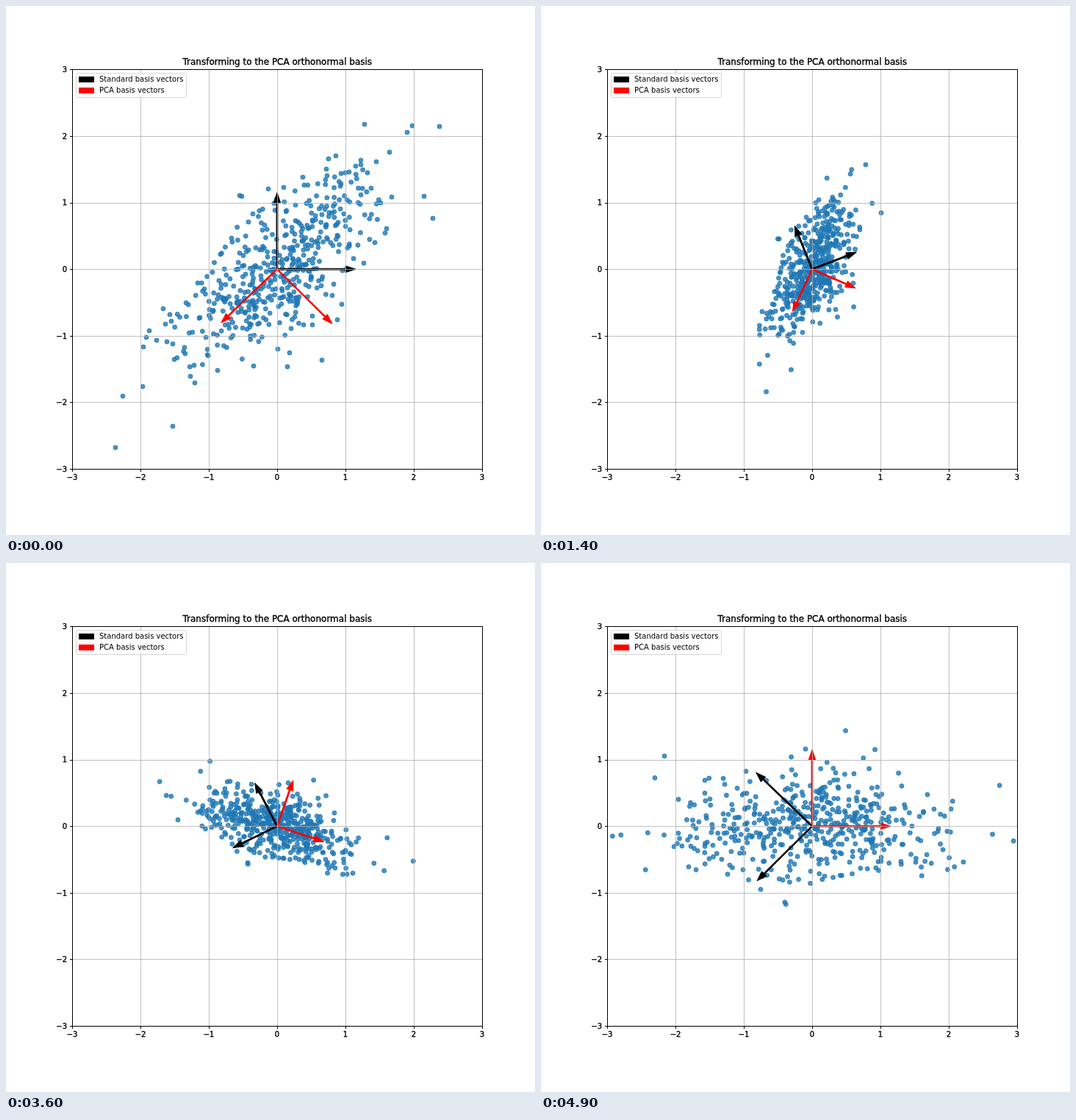
An HTML page with a canvas for the animation above (6.9 s loop, 720 by 720 pixels).

```html
<!DOCTYPE html>
<html lang="en">
<head>
<meta charset="utf-8">
<title>Transforming to the PCA orthonormal basis</title>
<style>
  html, body { margin: 0; width: 100%; height: 100%; overflow: hidden; background: #fff; }
  canvas, svg { position: absolute; left: 0; top: 0; width: 720px; height: 720px; }
  text { font: 10px "DejaVu Sans", sans-serif; }
  .heavy text { stroke: #000; stroke-width: .35px; }
  .heavy .title { font-size: 12px; }
  .mid { text-anchor: middle; }
  .end { text-anchor: end; }
</style>
</head>
<body>
<canvas id="plot" width="720" height="720"></canvas>
<svg viewBox="0 0 720 720">
  <path id="grid" fill="none" stroke="#b0b0b0" stroke-width=".8"/>
  <path id="ticks" fill="none" stroke="#000"/>
  <rect x="90.5" y="86.5" width="558" height="544" fill="none" stroke="#000"/>
  <g id="labels" class="heavy">
    <text class="title mid" x="369.3" y="80.2">Transforming to the PCA orthonormal basis</text>
  </g>
  <rect x="95.5" y="91.5" width="150" height="33" rx="2" fill="#fff" fill-opacity=".8" stroke="#ccc" stroke-opacity=".8"/>
  <rect x="99" y="96" width="21" height="8"/>
  <rect x="99" y="111" width="21" height="8" fill="#f00"/>
  <text x="127" y="103.4">Standard basis vectors</text>
  <text x="127" y="118.2">PCA basis vectors</text>
</svg>
<script>
const CX = 369, CY = 358.2, SX = 93, SY = 90.6;
const STEPS = 49, STEP_MS = 100, LOOP_MS = 6900;
const ANGLE = 135.5 * Math.PI / 180, COS = Math.cos(ANGLE), SIN = Math.sin(ANGLE);
const COUNT = 500;
const ctx = document.getElementById('plot').getContext('2d');

// Axes
let grid = '', ticks = '', labels = '';
for (let k = -3; k <= 3; k++) {
  const gx = Math.floor(CX + k * SX + .5) + .5;
  const gy = Math.floor(CY - k * SY + .5) + .5;
  const name = String(k).replace('-', '\u2212');
  grid += `M${gx} 86.5V630.5M90.5 ${gy}H648.5`;
  ticks += `M${gx} 630.5V634M87 ${gy}H90.5`;
  labels += `<text class="mid" x="${CX + k * SX}" y="644.8">${name}</text>` +
            `<text class="end" x="83" y="${CY - k * SY + 3.8}">${name}</text>`;
}
document.getElementById('grid').setAttribute('d', grid);
document.getElementById('ticks').setAttribute('d', ticks);
document.getElementById('labels').insertAdjacentHTML('beforeend', labels);

// Outer points of the cloud, in pixels
const outer = [
  149,601, 227,572, 159,531, 186,518, 257,513, 251,504, 288,496, 229,481,
  256,489, 187,464, 191,451, 195,442, 205,455, 219,457, 227,460, 214,412,
  223,420, 225,429, 217,433, 337,490, 383,491, 386,472, 370,467, 430,482,
  451,427, 457,406, 444,394, 417,434, 405,434, 417,422, 487,350, 502,322,
  516,309, 518,303, 581,289, 569,259, 525,260, 510,268, 497,248, 492,227,
  522,199, 504,212, 546,172, 553,163, 590,164, 488,161, 483,210, 483,216,
  476,218, 439,208, 449,204, 436,222, 437,231, 404,233, 456,228, 467,226,
  378,247, 357,249, 318,258, 321,259, 261,377, 307,316, 330,294, 336,283
];
const points = [];
for (let i = 0; i < outer.length; i += 2)
  points.push([(outer[i] - CX) / SX, (CY - outer[i + 1]) / SY]);

// Inner points: seeded normal cloud along the principal axes
let seed = 20;
function random() {
  seed = seed + 0x6D2B79F5 | 0;
  let r = Math.imul(seed ^ seed >>> 15, 1 | seed);
  r = r + Math.imul(r ^ r >>> 7, 61 | r) ^ r;
  return ((r ^ r >>> 14) >>> 0) / 4294967296;
}
while (points.length < COUNT) {
  const r = Math.sqrt(-2 * Math.log(1 - random())), a = 2 * Math.PI * random();
  const u = r * Math.cos(a), v = .42 * r * Math.sin(a);
  if ((u / 2) ** 2 + (v / .86) ** 2 < 1)
    points.push([COS * u + SIN * v, COS * v - SIN * u]);
}

// Blend of the identity and the rotation into the PCA basis
function transform([x, y], p) {
  const a = 1 - p + p * COS, b = p * SIN;
  return [a * x - b * y, b * x + a * y];
}

function dot([x, y]) {
  ctx.beginPath();
  ctx.arc(CX + x * SX, CY - y * SY, 3, 0, 2 * Math.PI);
  ctx.fill();
  ctx.stroke();
}

function arrow([x, y], color) {
  const len = Math.hypot(x, y), c = x / len, s = y / len;
  const shape = [[0, .01], [len, .01], [len, .05], [len + .15, 0],
                 [len, -.05], [len, -.01], [0, -.01]];
  ctx.fillStyle = ctx.strokeStyle = color;
  ctx.beginPath();
  for (const [u, v] of shape)
    ctx.lineTo(CX + (c * u - s * v) * SX, CY - (s * u + c * v) * SY);
  ctx.closePath();
  ctx.fill();
  ctx.stroke();
}

const arrows = [
  [[1, 0], '#000'], [[0, 1], '#000'],
  [[COS, -SIN], '#f00'], [[SIN, COS], '#f00']
];

function draw(step) {
  const p = step / STEPS;
  ctx.clearRect(0, 0, 720, 720);
  ctx.save();
  ctx.beginPath();
  ctx.rect(90, 86.4, 558, 543.6);
  ctx.clip();
  ctx.lineWidth = 1;
  ctx.globalAlpha = .8;
  ctx.fillStyle = ctx.strokeStyle = '#1f77b4';
  for (const pt of points) dot(transform(pt, p));
  ctx.globalAlpha = 1;
  for (const [v, color] of arrows) arrow(transform(v, p), color);
  ctx.restore();
}

let shown = -1;
function tick() {
  const t = performance.now() % LOOP_MS;
  const step = Math.min(STEPS, Math.floor(t / STEP_MS));
  if (step !== shown) draw(shown = step);
  requestAnimationFrame(tick);
}
tick();
</script>
</body>
</html>
```
